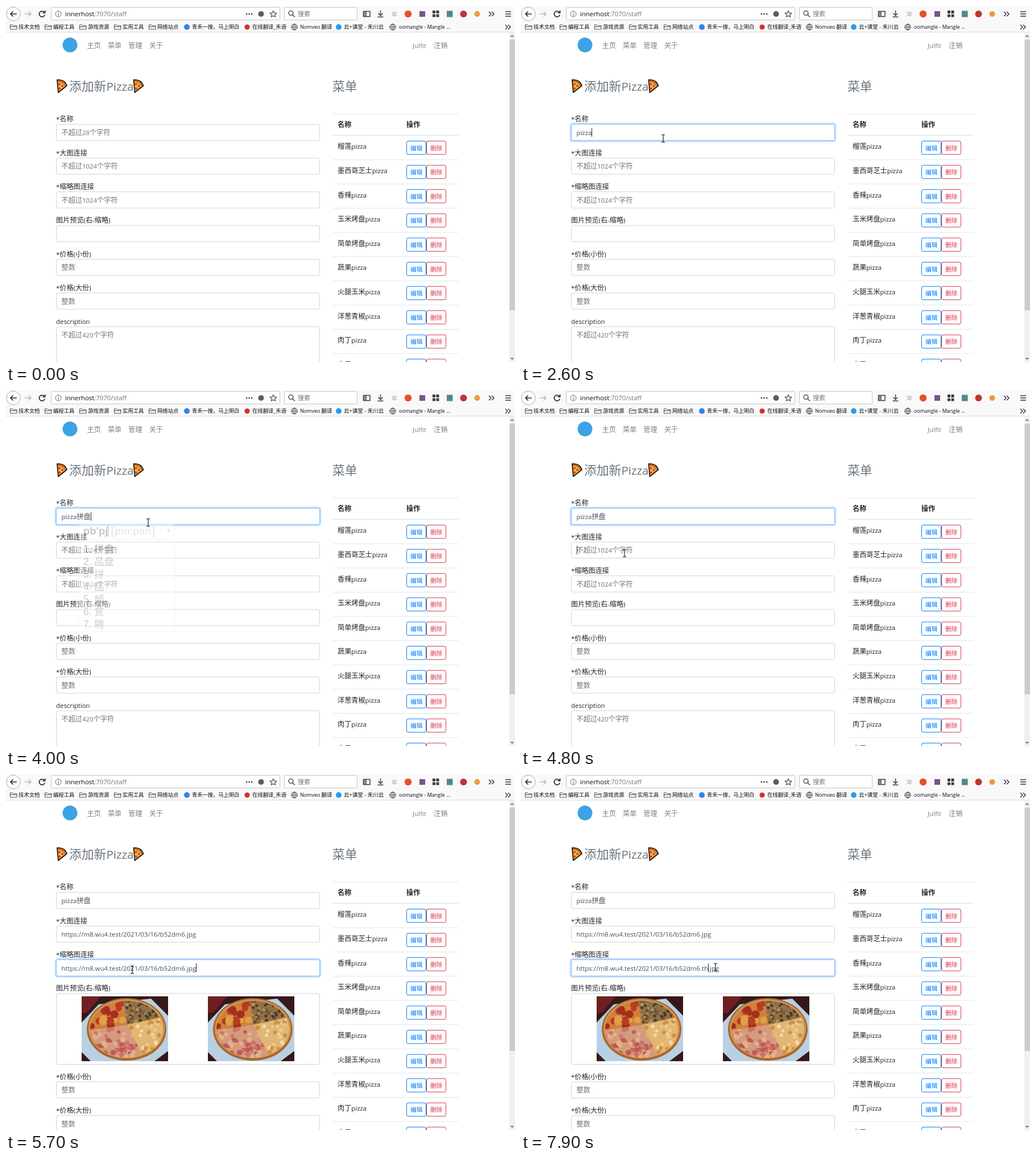
These frames come from a looping animation (895 px wide and 626 px high, 8 s). An HTML page:

```html
<!DOCTYPE html>
<html lang="zh-CN">
<head>
<meta charset="utf-8">
<title>Menu admin</title>
<style>
  html, body { margin: 0; width: 100%; height: 100%; overflow: hidden; background: #fff; }
  svg { display: block; width: 100vw; height: 100vh; }
  text { font-family: "Open Sans", "Noto Sans CJK SC", "Noto Sans CJK", sans-serif; }
  .ime text { font-family: "Liberation Sans", "Noto Sans CJK SC", "Noto Sans CJK", sans-serif; }
</style>
</head>
<body>
<svg id="stage" viewBox="0 0 895 626" xmlns="http://www.w3.org/2000/svg"></svg>
<script>
const LOOP = 8000;
const PITCH = 59.33;   // distance between form fields
const ROW = 42.6;      // distance between table rows
const INK = '#212529', MUTED = '#6c757d', CHROME = '#3b3b3d';

// Latin runs are set a little smaller than the Chinese around them.
const runs = s => s.replace(/[\x20-\x7e]+/g, m => `<tspan font-size=".94em">${m}</tspan>`);
const text = (x, y, s, fill = INK, size = 12.15, more = '') =>
  `<text x="${x}" y="${y}" fill="${fill}" font-size="${size}" ${more}>${runs(s)}</text>`;
const rect = (x, y, w, h, fill, more = '') =>
  `<rect x="${x}" y="${y}" width="${w}" height="${h}" fill="${fill}" ${more}/>`;
const dot = (x, y, r, fill, more = '') => `<circle cx="${x}" cy="${y}" r="${r}" fill="${fill}" ${more}/>`;
const line = (d, stroke = CHROME, width = 1.5, more = '') =>
  `<path d="${d}" fill="none" stroke="${stroke}" stroke-width="${width}" ${more}/>`;
const many = (n, make) => Array.from({ length: n }, (_, i) => make(i)).join('');

let seed = 7;
const rnd = () => (seed = (seed * 16807) % 2147483647) / 2147483647;

function scatter(n, x, y, w, h, r, colors) {
  return many(n, i => dot((x + rnd() * w).toFixed(1), (y + rnd() * h).toFixed(1),
    (r * (.7 + rnd() * .5)).toFixed(1), colors[i % colors.length]));
}

function photo() {
  const part = (points, fill) => `<polygon points="${points}" fill="${fill}"/>`;
  return `<clipPath id="top"><ellipse cx="79" cy="58" rx="64" ry="50"/></clipPath>
    <clipPath id="tl"><polygon points="0,0 72,0 80,50 0,62"/></clipPath>
    <clipPath id="tr"><polygon points="72,0 152,0 152,34 80,50"/></clipPath>
    <clipPath id="br"><polygon points="80,50 152,34 152,114 112,114"/></clipPath>
    <clipPath id="bl"><polygon points="80,50 112,114 0,114 0,62"/></clipPath>
    <clipPath id="edge"><rect width="152" height="114"/></clipPath>
    <g id="photo" clip-path="url(#edge)">
      ${rect(0, 0, 152, 114, '#35191a')}
      ${part('0,0 34,0 10,28 0,30', '#6e1f22')}
      ${part('0,46 30,14 122,4 152,34 152,96 128,114 16,114 0,98', '#b9d0e2')}
      <ellipse cx="79" cy="58" rx="70" ry="55" fill="#a9662c"/>
      <ellipse cx="79" cy="57" rx="67" ry="52" fill="#cf9450"/>
      <g clip-path="url(#top)">
        ${part('0,0 72,0 80,50 0,62', '#d0803a')}
        ${part('72,0 152,0 152,34 80,50', '#8f7147')}
        ${part('80,50 152,34 152,114 112,114', '#e2b673')}
        ${part('80,50 112,114 0,114 0,62', '#d59a7c')}
        <g clip-path="url(#tl)">${scatter(18, 18, 10, 58, 46, 6, ['#a52e1e', '#b83c22', '#e0a048'])}</g>
        <g clip-path="url(#tr)">${scatter(95, 70, 6, 76, 42, 2.4, ['#493724', '#b59463', '#6b5233'])}</g>
        <g clip-path="url(#br)">${scatter(46, 82, 38, 66, 66, 3.4, ['#f3dcab', '#cf9048', '#ecc88a'])}</g>
        <g clip-path="url(#bl)">${scatter(60, 14, 54, 90, 54, 4, ['#bd5a58', '#e3b188', '#cb7468'])}</g>
      </g>
    </g>`;
}

function slice(x) {
  return `<g transform="translate(${x} 128)" stroke-linejoin="round">
    <path d="M2 2Q15 1 19 12L4 24Z" fill="#fbb93a" stroke="#1c1207" stroke-width="1.8"/>
    <path d="M3 3Q14 3 18 12L15.5 13.5Q12 6 3 5.5Z" fill="#c8702a"/>
    ${dot(6, 9.5, 1.9, '#d8322a')}${dot(11, 12.5, 1.9, '#d8322a')}${dot(6.5, 17, 1.9, '#d8322a')}</g>`;
}

const folder = (x, s) =>
  line(`M${x + .5} 41V33H${x + 4.5}L${x + 6} 34.5H${x + 12}V41ZM${x + .5} 36.5H${x + 12}`, '#4a4a4c', 1) +
  text(x + 15, 40.3, s, '#0c0c0d', 9.35);
const globe = x => line(`M${x - 5} 37H${x + 5}M${x} 32V42`, CHROME, .8) +
  dot(x, 37, 5.2, 'none', `stroke="${CHROME}"`) +
  `<ellipse cx="${x}" cy="37" rx="2.6" ry="5.2" fill="none" stroke="${CHROME}" stroke-width=".8"/>`;
const chevrons = (x, y) => line(`M${x - 5} ${y - 4}l4 4l-4 4M${x} ${y - 4}l4 4l-4 4`);

function browser() {
  const box = 'rx="2" stroke="#c6c6c8"';
  const folders = ['技术文档', '编程工具', '游戏资源', '实用工具', '网络站点'];
  return rect(0, 0, 895, 46, '#f9f9fa') + rect(0, 45.5, 895, 1, '#d6d6d8') +
    dot(13, 14, 12, '#fff', 'stroke="#a9a9ab"') +
    line('M19 14H8M12.5 9.5L8 14L12.5 18.5', '#2a2a2c', 1.7) +
    line('M33 14H44M39.5 9.5L44 14L39.5 18.5', '#b8b8ba') +
    line('M67.5 11.3A5 5 0 1 0 68.2 15.5M68.6 8V12H64.6', '#2a2a2c', 1.7) +
    rect(79.5, 2.5, 402, 22, '#fff', box) + rect(489.5, 2.5, 128, 22, '#fff', box) +
    dot(92, 14, 5, 'none', 'stroke="#69696b"') + line('M92 13V17M92 10.7V12', '#69696b', 1.2) +
    `<text x="104" y="17.6" font-size="11.4" fill="#0c0c0d">innerhost<tspan fill="#737375">:7070/staff</tspan></text>` +
    many(3, i => dot(423 + i * 4.6, 14, 1.4, '#4a4a4c')) +
    dot(448.5, 14, 5, '#5b5b5d') +
    line('M470 8.4l1.7 3.7 4 .4-3 2.7.9 4-3.6-2-3.6 2 .9-4-3-2.7 4-.4Z', '#4a4a4c', 1.2) +
    dot(501, 12.5, 3.9, 'none', `stroke="${CHROME}" stroke-width="1.4"`) + line('M504 15.5L508 19.5') +
    text(513, 17.6, '搜索', '#737375', 11) +
    line('M628.5 9.5H640V18.5H628.5ZM633 9.5V18.5') + rect(629, 10, 4, 8, '#8a8a8c') +
    line('M658.5 8V16.5M654.5 12.8L658.5 16.8L662.5 12.8M653.5 19.3H663.5') +
    rect(679, 10, 8, 8, '#d3d3d5') +
    dot(707, 14, 6.2, '#e8502c') + rect(727, 9, 10, 10, '#75558c') +
    many(4, i => rect(750 + i % 2 * 6.5, 8 + (i >> 1) * 6.5, 5, 5, '#3d3d3f')) +
    rect(775, 8.5, 10.5, 11, '#4c8a88') + dot(804.5, 14, 6, '#b8392e') + dot(828.5, 14, 5, '#ea9a3c') +
    chevrons(854, 14) + line('M878 10H888M878 14H888M878 18H888') +
    folders.map((s, i) => folder(Math.round(7 + i * 61), s)).join('') +
    dot(318, 37, 5, '#3182ea') + text(327, 40.3, '青禾一搜，马上明白', '#0c0c0d', 9.25) +
    dot(424, 37, 4.6, '#dd2b2b') + text(433, 40.3, '在线翻译_禾语', '#0c0c0d', 9.35) +
    globe(507) + text(517, 40.3, 'Nomveo 翻译', '#0c0c0d', 9.5) +
    dot(585, 37, 5, '#2a9be8') + text(594, 40.3, '云+课堂 - 禾川云', '#0c0c0d', 9.6) +
    globe(680) + text(691, 40.3, 'oomangle - Mangle ...', '#0c0c0d', 9.6) +
    chevrons(883, 37) +
    rect(885, 47, 10, 579, '#f0f0f0') + rect(885.5, 59, 9.5, 476, '#cbcbcb', 'id="thumb"') +
    line('M887.5 54.5L890 52L892.5 54.5M887.5 618.5L890 621L892.5 618.5', '#555', 1.3);
}

const label = (i, s) => text(88, 203.3 + i * PITCH, s);
const box = (i, h = 28.5, more = '') =>
  rect(88.5, (208 + i * PITCH).toFixed(1), 463, h, '#fff', `rx="3" stroke="#ced4da" ${more}`);
const hint = (i, s, more = '') => text(97.5, 227 + i * PITCH, s, MUTED, 12.15, more);

function entry(i, name, prompt) {
  const y = 208 + i * PITCH;
  return label(i, name) + box(i) +
    `<g id="ring${i}">${rect(87, y - 1.5, 466, 31.5, 'none', 'rx="4" stroke="#bfdeff" stroke-width="2.6"')}
     ${rect(88.5, y, 463, 28.5, '#fff', 'rx="3" stroke="#80bdff"')}</g>` +
    hint(i, prompt, `id="hint${i}"`) + text(97.5, 227 + i * PITCH, '', '#495057', 12.15, `id="value${i}"`);
}

function form() {
  return slice(88) + text(111, 149, '添加新Pizza', MUTED, 21.8) + slice(222.5) +
    entry(0, '*名称', '不超过28个字符') + entry(1, '*大图连接', '不超过1024个字符') +
    entry(2, '*缩略图连接', '不超过1024个字符') +
    label(3, '图片预览(右-缩略)') + box(3, 28.5, 'id="preview"') +
    '<use href="#photo" x="133" y="391" id="pic0"/><use href="#photo" x="355" y="391" id="pic1"/>' +
    `<g id="lower">${label(4, '*价格(小份)')}${box(4)}${hint(4, '整数')}
      ${label(5, '*价格(大份)')}${box(5)}${hint(5, '整数')}
      ${label(6, 'description')}${box(6, 90)}${hint(6, '不超过420个字符')}</g>`;
}

function table() {
  const names = ['榴莲', '墨西哥芝士', '香辣', '玉米烤盘', '简单烤盘', '蔬果', '火腿玉米', '洋葱青椒', '肉丁', '水果'];
  const rule = (y, h = 1) => rect(574, y, 222, h, '#dceae9');
  const button = (x, y, s, color) => rect(x + .5, y, 34, 23.5, '#fff', `rx="2.5" stroke="${color}"`) +
    text(x + 7, y + 16, s, color, 10.7);
  return text(574, 149, '菜单', MUTED, 21.8) + rule(189.3) + rule(226.6, 1.6) +
    text(583, 213, '名称', INK, 12.15, 'font-weight="700"') +
    text(704, 213, '操作', INK, 12.15, 'font-weight="700"') +
    names.map((s, i) => {
      const y = i * ROW;
      return text(583, 251.3 + y, s + 'pizza') + button(704, 237.5 + y, '编辑', '#007bff') +
        button(739, 237.5 + y, '删除', '#dc3545') + rule((269.8 + y).toFixed(1));
    }).join('');
}

const nav = () => dot(112.5, 68.5, 13, '#3fa2e4') +
  ['主页', '菜单', '管理', '关于'].map((s, i) => text(142.5 + i * 36.4, 74, s, '#7f7f7f')).join('') +
  text(715, 74, 'Julfit', '#7f7f7f') + text(752, 74, '注销', '#7f7f7f');

const ime = () => `<g id="ime" class="ime">
  ${rect(128, 234, 162.5, 28, '#fff', 'class="pane" stroke="#e3e3e3"')}
  ${rect(128, 266.5, 162.5, 157.5, '#fff', 'class="pane" stroke="#e3e3e3"')}
  <text id="keys" x="136" y="254" font-size="18.5" font-weight="700" fill="#777"></text>
  ${rect(0, 237, 1, 21, '#555', 'id="keyCaret"')}
  <text id="spell" y="254" font-size="18.5" font-weight="700" fill="#cfcfcf"></text>
  <g id="arrows">${line('M268.5 244L265.5 247L268.5 250', '#eee', 1.2)}${line('M278 244L281 247L278 250', '#999', 1.2)}</g>
  ${many(7, i => `<text y="${286 + i * 22}" font-size="17.5" fill="${i ? '#888' : '#3c3c3c'}">
    <tspan x="136">${i + 1}.</tspan><tspan x="155" class="word" font-weight="300"></tspan></text>`)}</g>`;

const stage = document.getElementById('stage');
stage.innerHTML = `<defs>${photo()}</defs>` + rect(0, 0, 895, 626, '#fff') + nav() + form() + table() + browser() +
  rect(0, 0, 1, 15, '#222', 'id="caret"') + ime() +
  `<g id="mouse"><g id="beam">${line('M-3 -6.5H-.8L0 -5.7L.8 -6.5H3M0 -6V6M-3 6.5H-.8L0 5.7L.8 6.5H3', '#111', 1.1)}</g>
   <path id="arrow" d="M.5 .5V12L3.2 9.6L5 13.6L6.8 12.8L5 9H8.5Z" fill="#fff" stroke="#111" stroke-width=".9"/></g>`;

const $ = id => document.getElementById(id);
const show = (id, on) => $(id).setAttribute('visibility', on ? 'visible' : 'hidden');
const words = [...document.querySelectorAll('.word')], panes = [...document.querySelectorAll('.pane')];

const link = 'https://m8.wu4.test/2021/03/16/b52dm6';
const values = [
  [[0, ''], [1300, 'p'], [1500, 'pi'], [1600, 'piz'], [1800, 'pizz'], [1900, 'pizza'],
   [2900, 'pizza_'], [4000, 'pizza拼盘']],
  [[0, ''], [5200, link + '.jpg']],
  [[0, ''], [5700, link + '.jpg'], [7500, link + '..jpg'], [7800, link + '.t.jpg'], [7900, link + '.th.jpg']]
];
const focusAt = [650, 4800, 5450, Infinity];
const caretOn = [[0, 0], [700, 1], [1200, 0], [1300, 1], [2100, 0], [2600, 1], [2900, 0], [3600, 1],
  [4500, 0], [4800, 1], [7000, 0], [7500, 1]];
const imeFade = [[0, 0], [2900, .5], [3000, 1], [4000, .4], [4100, 0]];
const imeSteps = [
  [0, ['p', '[p]', '片 平 怕 跑 票 胖 陪']],
  [3100, ['pb', '[pin]', '品 拼 频 贫 聘 拚 姘']],
  [3400, ["pb'p", "[pin'pan]", '拼盘 品牌 拼拼 频频 判别 品品 派别']],
  [3600, ["pb'pj", "[pin'pan]", '拼盘 品盘 拼 品 频 贫 聘']]
];
const path = [[100, 777, 611], [600, 250, 233], [4300, 250, 233], [4700, 182, 287], [4900, 182, 287],
  [5000, 201.5, 335], [5200, 201.5, 335], [5400, 203, 340], [5600, 203, 340], [6000, 323, 366],
  [6300, 311, 341], [6500, 314, 340], [6600, 314, 340], [6900, 342, 340]];

const clamp = v => Math.min(1, Math.max(0, v));
const at = (steps, t) => steps.reduce((v, s) => s[0] <= t ? s[1] : v, steps[0][1]);

function pointer(t) {
  const i = path.findIndex(p => p[0] > t);
  if (i < 0) return path[path.length - 1].slice(1);
  if (!i) return path[0].slice(1);
  const [a, b] = [path[i - 1], path[i]], k = (t - a[0]) / (b[0] - a[0]), e = k * k * (3 - 2 * k);
  return [a[1] + (b[1] - a[1]) * e, a[2] + (b[2] - a[2]) * e];
}

function drawFields(t) {
  values.forEach((steps, i) => {
    const s = at(steps, t), el = $('value' + i);
    if (el.textContent !== s) el.innerHTML = runs(s);
    show('hint' + i, !s);
    $('ring' + i).setAttribute('opacity', clamp((t - focusAt[i]) / 150) - clamp((t - focusAt[i + 1]) / 150));
  });
  const active = t < 4800 ? 0 : t < 5500 ? 1 : 2, el = $('value' + active);
  const n = el.textContent.length - (t >= 6500 ? 4 : 0);
  $('caret').setAttribute('x', Math.round(97.5 + (n > 0 ? el.getSubStringLength(0, n) : 0)));
  $('caret').setAttribute('y', Math.round(214.5 + active * PITCH));
  show('caret', at(caretOn, t));
}

function drawIme(t) {
  const [keys, spell, list] = at(imeSteps, t), wide = t >= 3600 ? 6 : 0;
  $('ime').setAttribute('opacity', at(imeFade, t));
  $('keys').textContent = keys;
  $('spell').textContent = spell;
  const end = 136 + $('keys').getComputedTextLength();
  $('keyCaret').setAttribute('x', Math.round(end));
  $('spell').setAttribute('x', end + 5);
  $('arrows').setAttribute('transform', `translate(${wide})`);
  panes.forEach(p => p.setAttribute('width', 162.5 + wide));
  list.split(' ').forEach((w, i) => words[i].textContent = w);
}

function drawMouse(t) {
  const [x, y] = pointer(t);
  const overField = x > 88 && x < 552 && y > 208 && (y - 208) % PITCH < 29;
  $('mouse').setAttribute('transform', `translate(${Math.round(x)} ${Math.round(y)})`);
  show('beam', t >= 100 && overField);
  show('arrow', t >= 100 && !overField);
}

function draw(t) {
  const grown = t >= 5200;
  drawFields(t);
  drawIme(t);
  drawMouse(t);
  $('preview').setAttribute('height', grown ? 124.5 : 28.5);
  $('lower').setAttribute('transform', `translate(0 ${grown ? 96 : 0})`);
  $('thumb').setAttribute('height', grown ? 428 : 476);
  show('pic0', grown);
  show('pic1', t >= 5700);
}

const start = performance.now();
let last = -1;
function tick() {
  const t = Math.floor((performance.now() - start) % LOOP / 100) * 100;
  if (t !== last) draw(last = t);
  requestAnimationFrame(tick);
}
tick();
</script>
</body>
</html>
```
